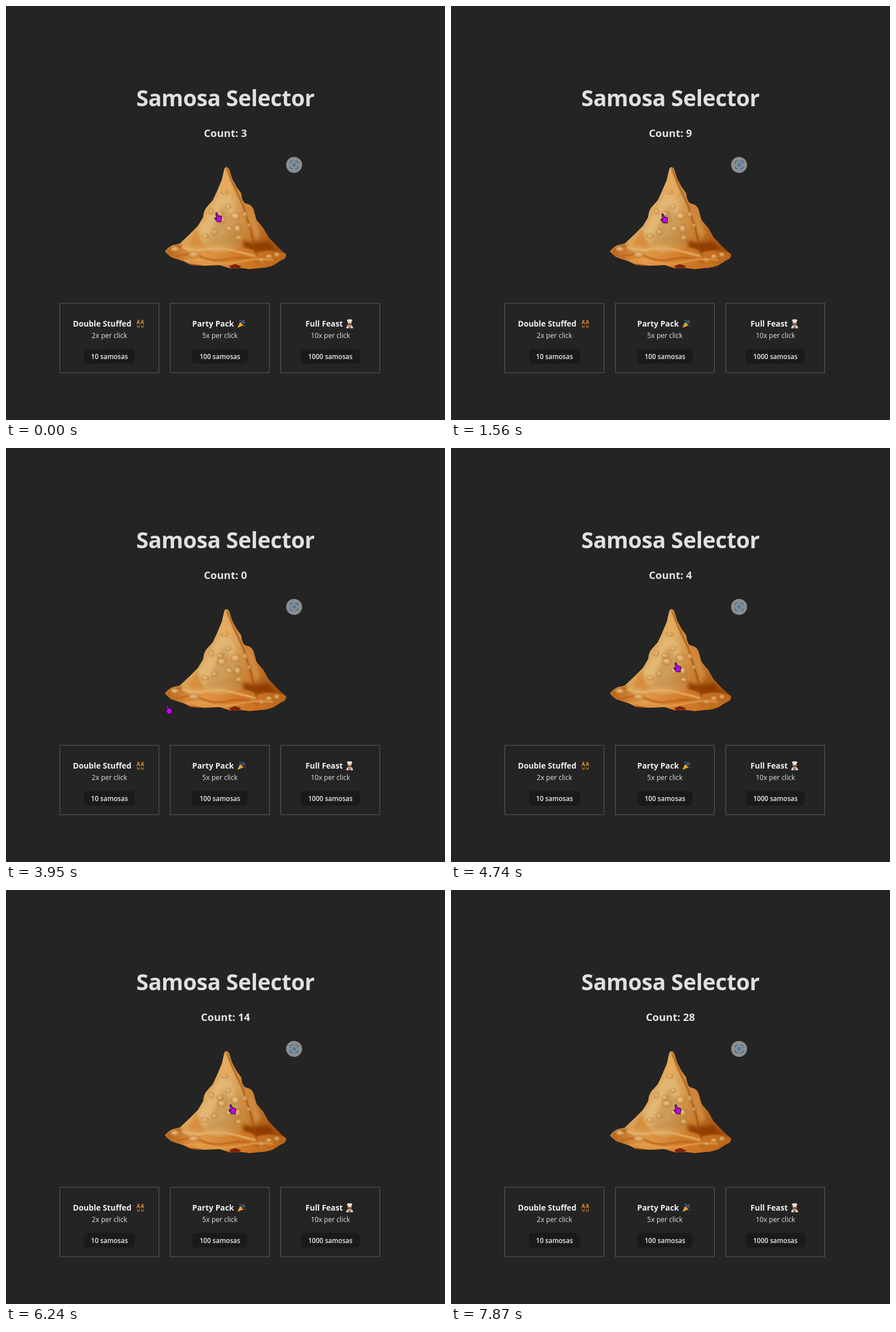
These frames come from a looping animation (771 px wide and 727 px high, 8000 ms). An HTML page:

```html
<!DOCTYPE html>
<html lang="en">
<head>
<meta charset="utf-8">
<title>Samosa Selector</title>
<style>
  html, body { margin: 0; width: 100%; height: 100%; overflow: hidden; background: #242424; }
  svg { display: block; width: 100%; height: 100%; }
  text { font-family: "Open Sans", "Noto Sans", sans-serif; fill: #e4e4e4; }
  .mid { text-anchor: middle; }
  .title { font-size: 39px; font-weight: 700; letter-spacing: -.4px; fill: #e0e0e0; }
  .count { font-size: 18.4px; font-weight: 700; }
  .name { font-size: 13.8px; font-weight: 700; fill: #f0f0f0; }
  .rate { font-size: 12px; }
  .price { font-size: 11.6px; font-weight: 600; fill: #ececec; }
  .frame { fill: none; stroke: #5c5c5c; }
  .button { fill: #1a1a1a; }
</style>
</head>
<body>
<svg viewBox="0 0 771 727">
  <defs>
    <linearGradient id="crust" x1="0" x2="1" y1=".3" y2=".6">
      <stop offset="0" stop-color="#c77a2b"/>
      <stop offset=".3" stop-color="#dda65d"/>
      <stop offset=".55" stop-color="#d9a35c"/>
      <stop offset=".75" stop-color="#c87a2b"/>
      <stop offset="1" stop-color="#a9560f"/>
    </linearGradient>
    <linearGradient id="side" x1="0" x2=".5" y1="0" y2="1">
      <stop offset="0" stop-color="#e0953f"/>
      <stop offset=".5" stop-color="#cd8236"/>
      <stop offset="1" stop-color="#a04c0a"/>
    </linearGradient>
    <linearGradient id="rim">
      <stop offset="0" stop-color="#b9661c"/>
      <stop offset=".25" stop-color="#e29a48"/>
      <stop offset=".6" stop-color="#d17a28"/>
      <stop offset="1" stop-color="#b96519"/>
    </linearGradient>
    <filter id="soft" x="-30%" y="-30%" width="160%" height="160%"><feGaussianBlur stdDeviation="3"/></filter>
    <filter id="slight"><feGaussianBlur stdDeviation=".8"/></filter>
    <path id="outline" d="M387 283Q391 283 393 290L397 303 405 318 413 329Q414 341 419 346L428 349Q435 354 436 362L440 376 452 390 461 406 475 421Q484 430 492 436Q492 444 484 446L470 455Q458 460 446 460L428 462 412 460 395 461 375 455 350 456 325 455 314 449 290 441Q283 436 279 431Q283 425 292 420L305 417 322 401 337 386 346 371Q347 358 354 351L363 341 370 326 379 305 383 287Q384 283 387 283Z"/>
    <clipPath id="inside"><use href="#outline"/></clipPath>
  </defs>

  <text class="mid title" x="385.3" y="176">Samosa Selector</text>
  <text class="mid count" id="count" x="385.3" y="229.5"></text>
  <g id="cards"></g>

  <g id="samosa">
    <g clip-path="url(#inside)">
      <use href="#outline" fill="url(#crust)"/>
      <g filter="url(#soft)">
        <path d="M384 310L399 345 405 390 360 415 325 412 358 360Z" fill="#e5bc7b" opacity=".75"/>
        <path d="M380 350L420 395 410 420 350 418Z" fill="#b98543" opacity=".5"/>
        <path d="M279 431L305 417 316 440 300 448Z" fill="#a9591a"/>
        <path d="M335 390L318 420 350 426Z" fill="#d78e3e"/>
      </g>
      <path d="M386 283L400 315 416 349 430 392 440 432 440 462 500 462V430L430 330 395 283Z" fill="url(#side)" filter="url(#slight)"/>
      <g filter="url(#soft)">
        <path d="M418 350L435 368 446 400 438 412Z" fill="#d18d42"/>
        <path d="M415 411L432 416 462 413 475 430 440 432 418 425Z" fill="#8f3c06"/>
        <path d="M384 284L375 325 390 335 399 325Z" fill="#e5ac60"/>
      </g>
      <path d="M284 428Q300 419 316 429T350 427Q374 438 400 429T440 434Q464 424 495 436L485 470H290Z" fill="url(#rim)" filter="url(#slight)"/>
      <g fill="none" stroke-linecap="round" filter="url(#slight)">
        <path d="M388 286L400 316 416 350 430 394 440 438" stroke="#984909" stroke-width="2"/>
        <path d="M310 424Q330 431 352 427T402 430T437 439" stroke="#e7b16a" stroke-width="3"/>
        <path d="M300 440Q325 432 345 441T393 444T443 451" stroke="#b9601a" stroke-width="2.5"/>
        <path d="M314 448Q340 444 358 450T410 449T468 446" stroke="#e5a04f" stroke-width="2.5"/>
      </g>
      <g id="bubbles" stroke-width="1.2" filter="url(#slight)"></g>
      <path d="M392 457L402 453 413 457 407 462H396Z" fill="#7b2406"/>
      <path d="M317 452L345 455 332 459Z" fill="#a94d10"/>
    </g>
    <g id="lens" fill="none" stroke="#2b6cad" stroke-width="1.5">
      <circle cx="506" cy="279" r="14" fill="#8d8d8d" stroke="none"/>
      <circle cx="506" cy="279" r="2"/>
    </g>
  </g>

  <g id="cursor" stroke-linejoin="round">
    <path id="hand" fill="#c400ff" stroke="#111" stroke-width="1.1" d="M2.2 2Q3.5.2 5 2L6.7 6.4 11 7.4Q13.4 8.3 12.8 10.7L11.8 14.3V17H5.2L1 12.2Q-.1 10.3 1.8 9.9L4.2 11.2Z"/>
    <path id="arrow" fill="#d000f5" stroke="#300038" stroke-width=".5" d="M0 0V10L2.4 8 4.1 12 5.9 11.2 4.3 7.4H7.5Z"/>
  </g>
</svg>

<script>
const byId = id => document.getElementById(id);
const add = (id, markup) => byId(id).insertAdjacentHTML("beforeend", markup);

// Small pictures beside the card names, drawn around their own centre
const dancer = x => `<g transform="translate(${x})" stroke="#c9862f" fill="#c9862f">
  <path d="M-1-7v3M1-7v3M-2.7 0L-2-2H2L2.7 0M-1.2 4V7M1.2 4V7" fill="none" stroke-width="1.2"/>
  <circle cy="-3" r="1.7" stroke="none"/><path d="M-1.6-1H1.6L2 4H-2Z" fill="#17130f" stroke-width=".6"/></g>`;
const dancers = dancer(-3.6) + dancer(3.6);
const popper = `<path d="M-6.5 7L-2-3 4 3Z" fill="#f1b23b"/>
  <path d="M-4 2L-1 5M-3-1L2 4" stroke="#c97a1d"/>
  <path d="M0-2Q3-3 1-6M2 0Q4-3 7-2" fill="none" stroke="#2188d9" stroke-width="1.5"/>
  <g fill="#d9482b"><circle cx="5" cy="-5" r="1.3"/><circle cx="6" cy="3" r="1"/></g><circle cx="-2" cy="-6" r="1" fill="#3a9de0"/>`;
const cook = `<path d="M-6 8Q-6 2 0 2T6 8Z" fill="#d5d2cf"/><path d="M-2 2L0 5 2 2V8H-2Z" fill="#9c6550"/>
  <circle cy="-1" r="3.7" fill="#a5663f"/><path d="M-3-1.5V-4Q-6-5-4-7Q-2-8.5 0-7.5Q2-8.5 4-7Q6-5 3-4V-1.5Z" fill="#e7e5e2"/>
  <path d="M-1.4 1H1.4" stroke="#5b2c19"/>`;

const cards = [
  { left: 94.5, name: "Double Stuffed", nameX: 117.5, iconX: 236, icon: dancers, rate: 2, price: 10, width: 89 },
  { left: 288.5, name: "Party Pack", nameX: 327, iconX: 413, icon: popper, rate: 5, price: 100, width: 97 },
  { left: 482.5, name: "Full Feast", nameX: 526, iconX: 603.5, icon: cook, rate: 10, price: 1000, width: 104 },
];
for (const c of cards) {
  const middle = c.left + 87.2;
  add("cards", `<rect class="frame" x="${c.left}" y="522" width="174" height="122"/>
    <text class="name" x="${c.nameX}" y="562.5">${c.name}</text>
    <g transform="translate(${c.iconX} 558)">${c.icon}</g>
    <text class="mid rate" x="${middle}" y="583.3">${c.rate}x per click</text>
    <rect class="button" x="${middle - c.width / 2}" y="602" width="${c.width}" height="26" rx="6"/>
    <text class="mid price" x="${middle}" y="620">${c.price} samosas</text>`);
}

const bubbles = [[379, 375, 8, 6], [403, 369, 8, 7], [390, 352, 5, 4], [376, 365, 6, 4], [392, 391, 6, 5],
  [407, 391, 6, 7], [384, 327, 6, 3], [366, 397, 5, 4], [350, 404, 6, 4], [297, 427, 8, 5], [330, 437, 11, 5],
  [462, 440, 6, 4], [449, 446, 5, 3], [476, 437, 5, 4], [427, 385, 4, 3], [420, 366, 4, 5], [409, 407, 6, 4], [361, 361, 4, 5]];
for (const [x, y, rx, ry] of bubbles)
  add("bubbles", `<g transform="translate(${x} ${y})"><ellipse rx="${rx}" ry="${ry}" fill="#d69a4d" fill-opacity=".65" stroke="#a86522" stroke-opacity=".6"/>
    <ellipse cx="-1" cy="-1" rx="${rx * .55}" ry="${ry * .5}" fill="#eccb91" opacity=".7"/></g>`);

for (const angle of [0, 90, 180, 270])
  add("lens", `<path d="M499.5 277V274.5Q499.5 272.5 501.5 272.5H504" transform="rotate(${angle} 506 279)"/>`);

const LOOP = 8000, BUY = 3430, LEAVE = 2250, RETURN = 3950;
const REST = 1 / 1.1, PRESSED = .95 / 1.1;
const presses = [[130, 260], [390, 520], [640, 920], [1440, 1560], [1850, 1990], [4360, 4490], [4610, 4740],
  [5020, 5170], [5310, 5590], [5720, 5840], [5980, 6240], [6380, 6510], [6650, 6770], [6920, 7210],
  [7470, 7600], [7740, 7870]];
const singles = [260, 520, 770, 920, 1050, 1560, 1990];
const doubles = [4490, 4740, 5170, 5450, 5840, 6110, 6240, 6510, 6770, 6920, 7060, 7600, 7740, 7870];
// time, x, y, shape
const pointer = [[0, 366, 362, "hand"], [390, 368, 364, "hand"], [2250, 250, 560, "arrow"], [2370, 178, 671, "arrow"],
  [2520, 178, 667, "arrow"], [2640, 178, 655, "arrow"], [2760, 178, 640, "arrow"], [2880, 177, 623, "hand"],
  [3000, 177, 617, "hand"], [3690, 205, 575, "arrow"], [3820, 250, 510, "arrow"], [3950, 279, 450, "hand"],
  [4080, 350, 400, "hand"], [4230, 391, 376, "hand"]];

const passed = (times, t) => times.filter(time => time <= t).length;

function draw(t) {
  const hovered = t < LEAVE || t >= RETURN;
  const pressed = presses.some(([from, to]) => t >= from && t < to);
  const scale = pressed ? PRESSED : hovered ? 1 : REST;
  byId("samosa").setAttribute("transform", `translate(385.5 367) scale(${scale}) translate(-385.5 -367)`);
  byId("lens").style.display = hovered ? "" : "none";

  const count = t < BUY ? 3 + passed(singles, t) : 2 * passed(doubles, t);
  byId("count").textContent = `Count: ${count}`;

  const [, x, y, shape] = pointer.findLast(([time]) => time <= t);
  byId("cursor").setAttribute("transform", `translate(${x} ${y})`);
  for (const id of ["hand", "arrow"]) byId(id).style.display = id === shape ? "" : "none";
}

const start = performance.now();
function tick() {
  draw((performance.now() - start) % LOOP);
  requestAnimationFrame(tick);
}
tick();
</script>
</body>
</html>
```
